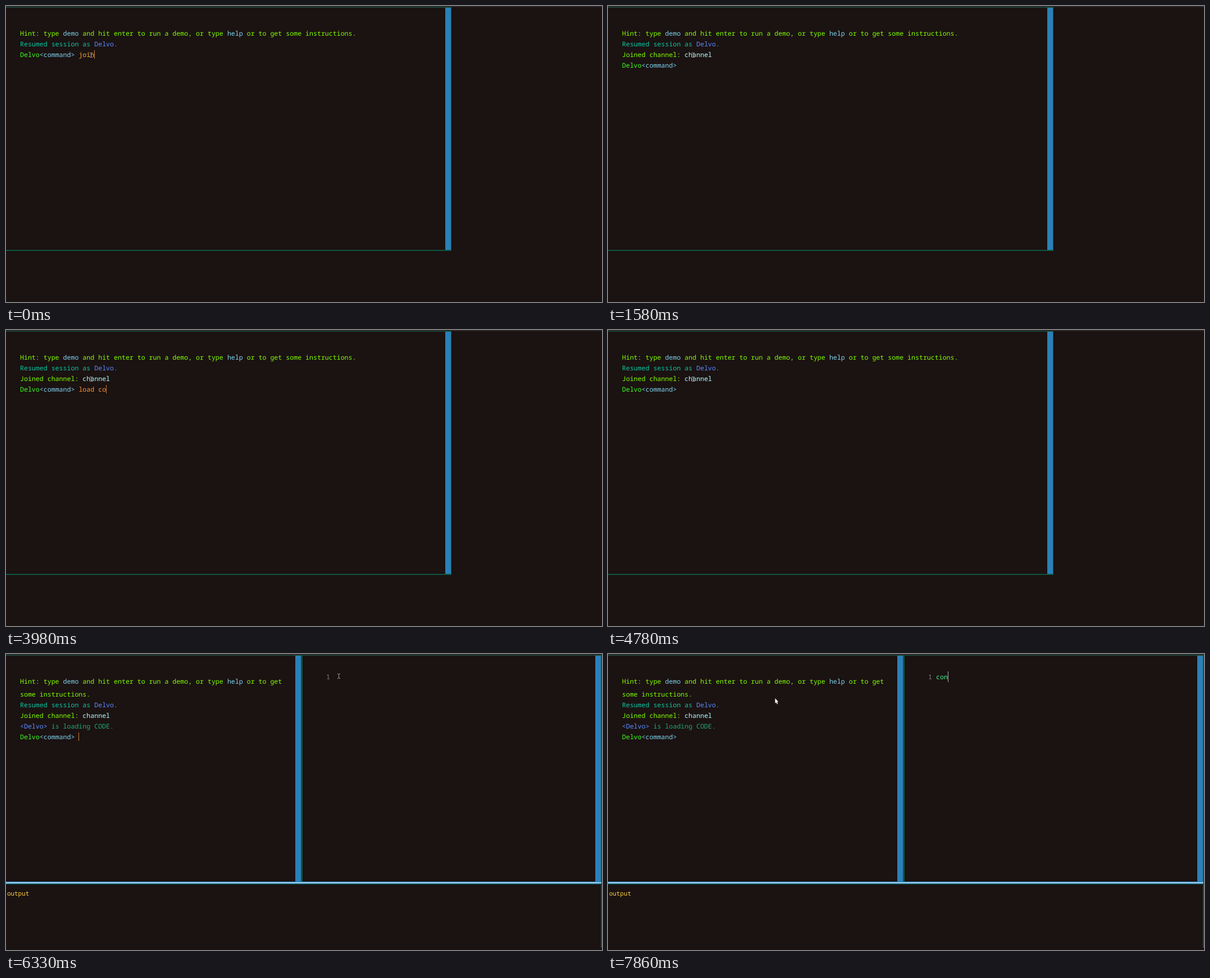
Write an HTML page with a canvas that moves like this. It is 1061 px wide and 528 px high and loops after 7.99 s.

```html
<!DOCTYPE html>
<html lang="en">
<head>
<meta charset="utf-8">
<title>Shared terminal session</title>
<style>
html, body { margin: 0; height: 100%; overflow: hidden; background: #1b1212; }
canvas { display: block; }
</style>
</head>
<body>
<canvas id="stage" width="1061" height="528"></canvas>
<script>
const ctx = document.getElementById('stage').getContext('2d');
const LOOP = 7990, LEFT = 25, PITCH = 6.96;
const USER = 'Delvo';
const BG = '#1b1212', GREEN = '#0d5640', BLUE = '#2a80b9';
const LIME = '#80ff00', SKY = '#7fd4ee', TEAL = '#0ac8a0', NAME = '#5b8cff';
const ORANGE = '#ffa530', CORAL = '#ff9433', SEA = '#1fa876';

// Each entry holds from its time until the next one.
const typing = [
  [0, 'join'], [130, 'join '], [260, 'join c'], [390, 'join ch'], [520, 'join cha'],
  [670, 'join chann'], [930, 'join channel'], [1450, ''],
  [3040, 'l'], [3160, 'lo'], [3560, 'loa'], [3710, 'load '],
  [3980, 'load co'], [4110, 'load cod'], [4230, 'load code'], [4780, '']
];
const promptCaret = [
  [0, true], [1450, false], [1980, true], [2640, false], [3040, true],
  [4780, false], [4910, true], [5420, false], [5970, true], [6480, false]
];
const editorText = [[0, ''], [7570, 'c'], [7720, 'co'], [7860, 'con']];
const editorCaret = [[0, false], [6480, true], [7020, false], [7570, true]];
const pointer = [
  [0, ['beam', 151, 87]], [5810, ['beam', 427, 27]], [5970, ['arrow', 520, 2]],
  [6090, ['beam', 570, 13]], [6210, ['beam', 588, 30]], [6330, ['beam', 592, 39]],
  [6480, ['beam', 609, 47]], [6750, ['none']], [6900, ['beam', 605, 41]],
  [7020, ['arrow', 297, 79]]
];

const at = (track, t) => track.findLast(step => step[0] <= t)[1];

function rect(color, x, y, w, h) {
  ctx.fillStyle = color;
  ctx.fillRect(x, y, w, h);
}

// Draws alternating colours and strings along one baseline.
function line(y, runs, x = LEFT, size = 11.6) {
  ctx.font = `500 ${size}px "Noto Sans Mono", "DejaVu Sans Mono", monospace`;
  for (let i = 0; i < runs.length; i += 2) {
    ctx.fillStyle = runs[i];
    ctx.fillText(runs[i + 1], x, y);
    x += runs[i + 1].length * size * 0.6;
  }
}

function frames(split) {
  rect(BG, 0, 0, 1061, 528);
  rect('#2c2727', 0, 0, 1061, 2);
  if (!split) {
    rect(GREEN, 0, 2, 793, 1);
    rect(BLUE, 782, 3, 10, 432);
    rect(GREEN, 792, 2, 1, 435);
    rect(GREEN, 0, 435, 793, 2);
    return;
  }
  rect(GREEN, 0, 2, 1061, 1);
  for (const [x, w] of [[515, 3], [1049, 2]]) {
    rect(BLUE, x, 3, 10, 403);
    rect(GREEN, x + 10, 3, w, 403);
  }
  rect(BLUE, 0, 406, 1060, 4);
  rect('#a5cdec', 0, 407, 1060, 2);
  rect(GREEN, 0, 410, 1060, 1);
  rect(GREEN, 1059, 411, 2, 113);
  line(431, ['#ffd23c', 'output'], 2, 10.9);
}

function prompt(y, t) {
  const text = at(typing, t);
  line(y, ['#3cff1e', USER, SKY, '<command> ', t < 1450 ? ORANGE : CORAL, text]);
  if (at(promptCaret, t)) {
    rect('#c98037', Math.floor(LEFT + (15 + text.length) * PITCH), y - 12, 1, 15);
  }
}

function terminal(t, split) {
  const hint = [LIME, 'Hint: type ', SKY, 'demo',
    LIME, ' and hit enter to run a demo, or type ', SKY, 'help', LIME, ' or to get'];
  const tail = 'some instructions.';
  line(53, split ? hint : [...hint, LIME, ' ' + tail]);
  if (split) line(76, [LIME, tail]);
  let y = split ? 95 : 72;
  const add = runs => { line(y, runs); y += 19; };
  add([TEAL, 'Resumed session as ', NAME, USER, TEAL, '.']);
  if (t >= 1580) add([LIME, 'Joined channel: ', '#b4ffff', 'channel']);
  if (split) add([NAME, `<${USER}>`, SEA, ' is loading CODE.']);
  prompt(y, t);
}

function editor(t) {
  const text = at(editorText, t);
  line(45, ['#858080', '1'], 570);
  line(45, ['#4af08c', text], 584);
  if (at(editorCaret, t)) {
    rect('#a8b4aa', Math.floor(584.2 + text.length * PITCH), 31, 1, 19);
  }
}

function drawPointer([kind, x, y]) {
  if (kind === 'beam') {
    const gray = '#a8a4a4';
    rect(gray, x, y - 3, 1, 7);
    for (const dy of [-4, 4]) {
      rect(gray, x - 2, y + dy, 2, 1);
      rect(gray, x + 1, y + dy, 2, 1);
    }
  } else if (kind === 'arrow') {
    ctx.save();
    ctx.translate(x, y);
    ctx.fillStyle = '#fff';
    ctx.fill(new Path2D('M.5 0V9L2.5 7.2 4 10.5 5.4 9.9 4 6.6H6.4Z'));
    ctx.restore();
  }
}

function draw(now) {
  const t = now % LOOP, split = t >= 4910;
  frames(split);
  terminal(t, split);
  if (split) editor(t);
  drawPointer(at(pointer, t));
}

ctx.textRendering = 'geometricPrecision';
let start;
function tick(now) {
  start ??= now;
  draw(now - start);
  requestAnimationFrame(tick);
}
requestAnimationFrame(tick);
</script>
</body>
</html>
```
